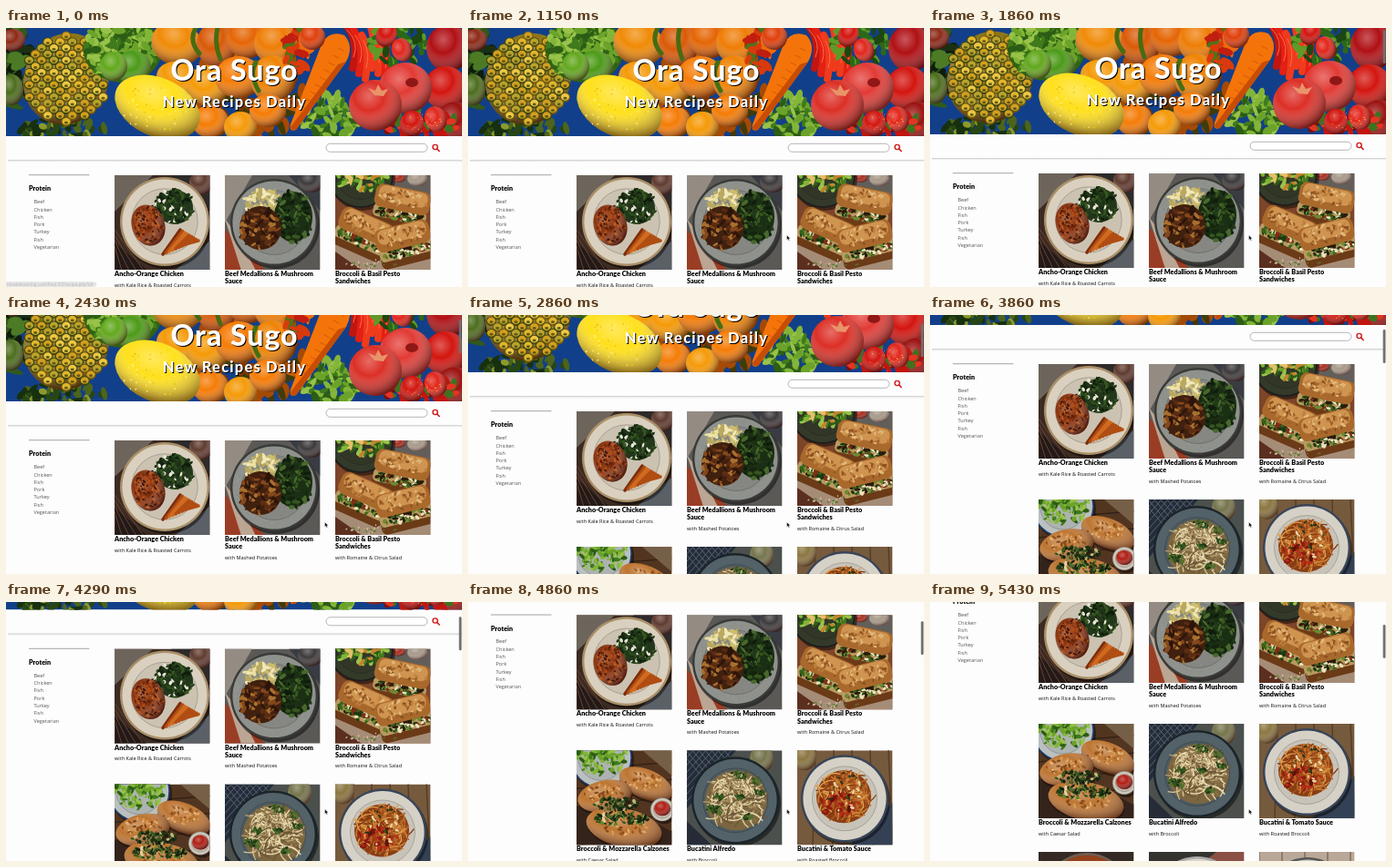
Write an HTML page that moves like this. It is 500 px wide and 285 px high and loops after 5570 ms.

```html
<!DOCTYPE html>
<html lang="en">
<head>
<meta charset="utf-8">
<title>Recipes</title>
<style>
html, body { margin: 0; width: 100%; height: 100%; overflow: hidden; background: #fdfdfd; }
#stage { display: block; width: 500px; height: 285px; }
.brand { font: 800 32px Lato, sans-serif; letter-spacing: 1px; }
.tagline { font: 800 16.5px Lato, sans-serif; letter-spacing: 1.2px; }
.brand, .tagline { fill: #fff; text-anchor: middle; filter: drop-shadow(1.3px 1.3px .6px #000); }
.name { font: 900 7.25px Lato, sans-serif; fill: #000; }
.note { font: 5.55px "Open Sans", sans-serif; fill: #111; }
.item { font: 5.55px "Open Sans", sans-serif; fill: #555; }
.status { font: 4.6px "Open Sans", sans-serif; fill: #b4b4b4; }
</style>
</head>
<body>
<svg id="stage" viewBox="0 0 500 285">
  <defs>
    <radialGradient id="round" cx=".38" cy=".32" r=".72">
      <stop offset="0" stop-color="#fff" stop-opacity=".3"/>
      <stop offset=".4" stop-color="#fff" stop-opacity="0"/>
      <stop offset="1" stop-color="#200" stop-opacity=".65"/>
    </radialGradient>
    <linearGradient id="fade" x2="0" y2="1">
      <stop stop-color="#888" stop-opacity=".25"/>
      <stop offset="1" stop-color="#888" stop-opacity="0"/>
    </linearGradient>
  </defs>
  <g id="page"></g>
  <rect id="thumb" x="496.7" width="2.8" height="37" rx="1.4" fill="#707070"/>
  <g id="status">
    <path d="M0 279H95q2 0 2 2V285H0z" fill="#e6e6e6"/>
    <text class="status" x="1" y="283.6">mirabeltanning.com/final-3/3/recipe.php?id=3</text>
  </g>
  <path id="cursor" d="M349.6 228v5.2l1.2-1 .9 1.9 .9-.4-.9-1.9h1.7z" fill="#000" stroke="#fff" stroke-width=".4"/>
</svg>
<script>
let seed = 11;
const random = () => (seed = (seed * 16807) % 2147483647) / 2147483647;
const pick = list => list[Math.floor(random() * list.length)];
const repeat = (n, draw) => Array.from({ length: n }, (_, i) => draw(i)).join('');

const rect = (x, y, w, h, fill, more = '') =>
  `<rect x="${x}" y="${y}" width="${w}" height="${h}" fill="${fill}" ${more}/>`;
const oval = (x, y, rx, ry, fill, turn = 0, more = '') =>
  `<ellipse cx="${x}" cy="${y}" rx="${rx}" ry="${ry}" fill="${fill}" transform="rotate(${turn} ${x} ${y})" ${more}/>`;
const solid = (x, y, rx, ry, fill, turn) =>
  oval(x, y, rx, ry, fill, turn) + oval(x, y, rx, ry, 'url(#round)', turn);
const shape = (d, fill) => `<path d="${d}" fill="${fill}"/>`;
const line = (d, color, width) =>
  `<path d="${d}" fill="none" stroke="${color}" stroke-width="${width}" stroke-linecap="round"/>`;
const text = (kind, x, y, words) =>
  `<text class="${kind}" x="${x}" y="${y}">${words.replace('&', '&amp;')}</text>`;
const frame = (x, y, w, h, body) =>
  `<svg x="${x}" y="${y}" width="${w}" height="${h}">${body}</svg>`;

// Random point inside an ellipse
function spot(x, y, rx, ry) {
  const a = random() * 6.283, r = Math.sqrt(random());
  return [x + Math.cos(a) * r * rx, y + Math.sin(a) * r * ry];
}
const scatter = (n, x, y, rx, ry, size, colors) => repeat(n, () => {
  const [px, py] = spot(x, y, rx, ry);
  return oval(px, py, size * (.6 + random() * .8), size * (.3 + random() * .4), pick(colors), random() * 180);
});
const noodles = (n, x, y, r, colors) => repeat(n, () => {
  const [px, py] = spot(x, y, r * .8, r * .75), w = r * (.15 + random() * .25);
  const a = random() * 6.283, dx = Math.cos(a) * w, dy = Math.sin(a) * w;
  return line(`M${px - dx} ${py - dy}q${dx - dy * .8} ${dy + dx * .8} ${dx * 2} ${dy * 2}`, pick(colors), 1.3);
});
const plate = (x, y, r, rim, base) =>
  oval(x + 2, y + 3, r, r, '#0007') + oval(x, y, r, r, rim) +
  oval(x, y, r * .95, r * .95, base) + oval(x, y, r * .74, r * .74, '#0001', 0, 'stroke="#0003"');

const greens = ['#14240f', '#22391a', '#36551f', '#0f1c0c', '#1b3013'];
const lettuce = ['#3f7a1c', '#6ba32a', '#98c24a', '#2c5c15', '#82b538'];

function banner() {
  const orange = '#f57c06', amber = '#f59a08', red = '#d3150f';
  const pineapple = solid(66, 56, 46, 51, '#8d7416', 25) + repeat(100, i => {
    const u = (i % 10 - 4.5) * 9.5, v = (Math.floor(i / 10) - 4.5) * 9.5;
    const x = 66 + (u - v) * .71, y = 56 + (u + v) * .71;
    if (((x - 66) / 45) ** 2 + ((y - 56) / 48) ** 2 > 1) return '';
    return oval(x, y, 5.6, 5.3, pick(['#4b4a12', '#6f5a14', '#394514'])) +
      oval(x, y - .4, 4.5, 3.8, pick(['#e2b62c', '#d3a01f', '#b9a42c', '#edc843'])) + oval(x, y + 1, 2, 1.4, '#5d5a16');
  });
  const chilies = repeat(6, i =>
    line(`M${372 + i * 9} ${-4 + i % 3 * 6}q${16 - i * 3} 18 ${8 - i * 2} 48`, pick(['#e32013', '#c3150f', '#f03a1c']), 8) +
    line(`M${374 + i * 9} ${2 + i % 3 * 6}q${14 - i * 3} 14 ${7 - i * 2} 30`, '#ff6a4a', 1));
  const carrot = shape('M371 8q-17-6-25 10L312 106q-2 9 6 6L373 37q9-17-2-29z', '#f4740a') +
    shape('M373 37L318 112q-5 2-6-3L364 40z', '#c74c04') +
    repeat(9, i => line(`M${364 - i * 5} ${22 + i * 8}l6 3`, '#c95205', .8));
  return rect(0, 0, 500, 119, '#123f8a') +
    scatter(50, 6, 40, 20, 50, 10, [...greens, '#4c7a25', '#31591d']) +
    solid(7, 13, 14, 12, '#8d2a18') + solid(6, 68, 13, 17, '#4c6d1d') +
    scatter(70, 62, 115, 48, 16, 6, ['#4c641b', '#274613', '#8b9a2c', '#17300f']) +
    pineapple +
    oval(128, 24, 43, 36, '#2f6314') + scatter(160, 126, 22, 40, 31, 6, lettuce) +
    solid(139, 43, 20, 18, '#4c9a18') + solid(118, 42, 15, 16, '#62a81d') +
    scatter(90, 255, 62, 74, 62, 10, ['#7d3604', '#a54a05', '#403b0c', '#c45f06']) +
    solid(187, 17, 28, 24, '#f08a06', 20) + solid(231, 18, 22, 25, '#d95a06') +
    line('M208 0q-8 14 4 28M232 0q-4 17 3 34', '#476b12', 5) +
    solid(190, 58, 26, 20, amber, 25) +
    solid(265, 12, 23, 21, '#e56504') + solid(297, 17, 25, 24, '#ee7d06') +
    solid(222, 63, 23, 22, amber) + solid(255, 54, 26, 23, orange) +
    solid(292, 56, 24, 26, '#ef8304') + line('M274 38q-8 12 3 31', '#456f14', 5) +
    solid(224, 103, 20, 18, orange) + solid(257, 109, 18, 17, amber) +
    solid(287, 91, 20, 18, orange) +
    solid(166, 87, 49, 32, '#ffe01c', 24) + scatter(60, 166, 87, 42, 26, 1.2, ['#fff08a', '#e8c40c']) +
    scatter(30, 320, 22, 15, 26, 7, ['#d93a0c', '#c11e0f', '#ee6a0c', '#4c741a']) +
    scatter(80, 356, 97, 34, 24, 6, lettuce) + chilies + carrot +
    solid(336, 10, 14, 14, '#e0400c') +
    scatter(60, 432, 16, 32, 24, 6, ['#2c6818', '#5f9a28', '#1d4712']) +
    solid(417, 8, 11, 13, red, 30) + solid(434, 24, 11, 13, '#e2261c', -25) +
    solid(485, 22, 24, 26, '#b01015') + solid(482, 66, 24, 24, red) +
    solid(493, 103, 22, 22, '#9a1210') + scatter(50, 455, 106, 40, 14, 7, ['#c3150f', '#e53322', '#7c0e0b', '#3d7320']) +
    solid(438, 66, 29, 28, '#e23a34') + oval(445, 60, 7, 5, '#8f1715') +
    solid(405, 85, 29, 28, '#dc2f26') + shape('M404 74l-7-8 8 3 3-7 4 7 7-2-5 8z', '#e8946a') +
    solid(445, 105, 13, 14, red, 20) + solid(471, 100, 12, 14, '#e2261c', -20) +
    scatter(40, 458, 103, 20, 11, .7, ['#f6b04b']) +
    text('brand', 250.5, 58.3, 'Ora Sugo') + text('tagline', 250.5, 87, 'New Recipes Daily');
}

const sandwich = (x, y, turn) => `<g transform="translate(${x} ${y}) rotate(${turn}) scale(1.18)">` +
  rect(-25, 0, 50, 19, '#6b3a17', 'rx="5"') + rect(-25, 0, 50, 12, '#b99a62', 'rx="4"') +
  scatter(70, 0, 6, 24, 5, 2.6, ['#37611c', '#1d3a10', '#efe0bd', '#7d2f16', '#6c8a30', '#2a1a0c']) +
  rect(-26, -19, 52, 22, '#a9692c', 'rx="7"') + rect(-23, -18, 46, 14, '#cf9450', 'rx="6"') +
  scatter(50, 0, -9, 23, 8, 2, ['#e2b87a', '#a2622a', '#bd8040', '#8d5220']) + '</g>';
const calzone = (x, y, rx, ry, turn) =>
  oval(x + 1, y + 3, rx, ry, '#20100a99', turn) + solid(x, y, rx, ry, '#bd7531', turn) +
  scatter(40, x, y - 3, rx * .75, ry * .6, 2, ['#d99c58', '#98561f', '#e4b67b', '#84481a']);

const photos = [
  () => rect(0, 0, 105, 105, '#3c2b22') + shape('M0 0H42L0 40z', '#6d655c') + shape('M62 0H105V40z', '#2e2a2a') +
    shape('M0 74L36 105H0z', '#211a18') + shape('M105 72V105H66z', '#5a6066') +
    repeat(5, i => line(`M${i * 8} 105L0 ${84 - i * 6}`, '#6d4032', 1)) +
    solid(95, 8, 13, 13, '#5f3b2f') +
    plate(55, 51, 49, '#a98f68', '#d9d0bf') +
    oval(66, 35, 20, 19, '#22371b') +
    scatter(120, 65, 34, 22, 19, 2.8, [...greens, '#e9e6d6', '#2c4c1c']) +
    repeat(9, i => line(`M${53 + i * 3.5} ${87 - i * 1.5}L${72 + i * 2.5} ${60 + i * 1.5}`, pick(['#b04d12', '#7d2c0a', '#cf6a20']), 3.5)) +
    solid(37, 55, 18, 23, '#8a330f', -18) +
    scatter(110, 37, 55, 16, 20, 2, ['#5c1f08', '#b04d18', '#742a0b', '#c0632a', '#431706']),
  () => rect(0, 0, 105, 105, '#5b5956') + shape('M0 0H30L0 52z', '#948c83') + shape('M70 0H105V40z', '#393d43') +
    shape('M0 60L45 105H0z', '#9a3d25') + shape('M0 48L14 66 34 105H18z', '#bba593') +
    solid(94, 7, 14, 12, '#3d3a3b') +
    plate(54, 52, 48, '#393b39', '#8f918c') + scatter(110, 54, 52, 43, 43, .6, ['#6c6e69', '#a9aba5']) +
    scatter(70, 42, 31, 21, 14, 4, ['#eadf9f', '#cdbd70', '#f1e8b9', '#b9a85f']) +
    oval(75, 46, 21, 28, '#1a2f13') + scatter(110, 75, 46, 21, 28, 3.5, [...greens, '#48692c']) +
    oval(39, 58, 23, 24, '#40200e') +
    scatter(100, 39, 58, 22, 22, 3.5, ['#5c2d14', '#2b140a', '#84481c', '#a9702f', '#40200e']),
  () => rect(0, 0, 105, 105, '#7d4529') + shape('M60 0H105V30L62 16z', '#625e5a') + shape('M0 66H105V105H0z', '#a58c77') +
    shape('M0 84L30 105H0z', '#5b2f20') + solid(69, 3, 8, 5, '#a92f20') + solid(90, 4, 11, 8, '#a89a8a') +
    plate(28, 0, 36, '#1d1e1d', '#343a2a') + scatter(110, 28, 0, 29, 16, 4, [...lettuce, '#c3832e', '#e3c06a']) +
    sandwich(72, 36, 12) + sandwich(30, 65, 24) + sandwich(76, 76, -14) +
    scatter(25, 40, 98, 28, 5, 1.6, ['#5b7b35', '#d0b69b']),
  () => rect(0, 0, 105, 105, '#523521') + repeat(6, i => line(`M0 ${i * 21}L105 ${i * 19 - 6}`, '#352216', 1.5)) +
    shape('M72 0H105V28z', '#756047') +
    plate(27, 8, 34, '#1d3c6b', '#b9c0bf') + scatter(130, 27, 6, 28, 21, 3.6, lettuce) +
    shape('M0 62L30 46 105 90V105H0z', '#33231a') +
    calzone(76, 37, 31, 16, 23) + calzone(31, 50, 30, 17, -12) + calzone(52, 85, 42, 21, 12) +
    scatter(90, 44, 59, 25, 7, 2.6, [...greens, '#c8b47a', '#8d7a45']) +
    scatter(90, 49, 75, 30, 7, 2.6, [...greens, '#5f8a2a', '#e3d19c', '#56682b']) +
    plate(94, 65, 13, '#8a867f', '#cfc7ba') + solid(94, 64, 9, 8, '#b01f14'),
  () => rect(0, 0, 105, 105, '#4c504d') + shape('M0 0H54L0 64z', '#232c3a') +
    repeat(8, i => line(`M${i * 7} 0L0 ${i * 8}M${i * 7 - 8} 0l24 28`, '#59616c', 1)) +
    solid(82, 9, 13, 15, '#75744c') + shape('M0 78L28 105H0z', '#252c37') +
    plate(53, 55, 48, '#1a2429', '#536168') + oval(54, 55, 34, 33, '#7c6640') +
    noodles(150, 54, 55, 35, ['#d9c798', '#b39a6a', '#eadbb1', '#8d744a', '#6b5636']) +
    repeat(10, () => scatter(14, ...spot(56, 55, 31, 31), 5, 4, 2.2, ['#35571f', '#1f3816', '#56702f'])),
  () => rect(0, 0, 105, 105, '#765a3d') + repeat(6, i => line(`M${i * 20} 0L${i * 22 - 5} 105`, '#543d29', 1.5)) +
    solid(8, 7, 13, 15, '#8a7640') + shape('M105 57V105H57z', '#344154') +
    plate(52, 53, 48, '#384459', '#d6d1c6') + oval(51, 51, 30, 29, '#8a3f14') +
    noodles(150, 51, 49, 31, ['#cf8034', '#a9541f', '#e0a050', '#84390f', '#b96a28']) +
    scatter(45, 46, 61, 22, 13, 3.2, ['#8f1c0f', '#b52f18', '#5f1409']) +
    scatter(26, 53, 46, 21, 22, 2, ['#425a1d', '#22351a', '#ead7a6']),
  () => rect(0, 0, 105, 105, '#342924') + plate(53, 49, 48, '#6b6057', '#93421d'),
  () => rect(0, 0, 105, 105, '#8a5045') + shape('M0 0H74L0 60z', '#34332f') + plate(53, 54, 49, '#aaa', '#ddd6ca'),
  () => rect(0, 0, 105, 105, '#b9a797') + repeat(5, i => line(`M${i * 25} 0V105`, '#8e7c6d', 2)) + plate(53, 54, 48, '#555', '#ccc')
];

const recipes = [
  ['Ancho-Orange Chicken', '', 'with Kale Rice & Roasted Carrots'],
  ['Beef Medallions & Mushroom', 'Sauce', 'with Mashed Potatoes'],
  ['Broccoli & Basil Pesto', 'Sandwiches', 'with Romaine & Citrus Salad'],
  ['Broccoli & Mozzarella Calzones', '', 'with Caesar Salad'],
  ['Bucatini Alfredo', '', 'with Broccoli'],
  ['Bucatini & Tomato Sauce', '', 'with Roasted Broccoli']
];
const rowTops = [162, 311, 452];

function card(photo, i) {
  const x = 119 + i % 3 * 121, y = rowTops[Math.floor(i / 3)];
  const [first, second, note] = recipes[i] || ['', '', ''];
  return frame(x, y, 104.3, 104, photo()) +
    text('name', x, y + 111.2, first) + text('name', x, y + 119.3, second) +
    text('note', x, y + (second ? 130.7 : 122.7), note);
}

const proteins = ['Beef', 'Chicken', 'Fish', 'Pork', 'Turkey', 'Fish', 'Vegetarian'];
const byId = id => document.getElementById(id);
const page = byId('page');
page.innerHTML = frame(0, 0, 500, 119, banner()) +
  rect(351, 127.3, 111, 9, '#fff', 'rx="4.5" stroke="#a3a3a3" stroke-width=".8"') +
  '<circle cx="470.6" cy="131" r="2.6" fill="none" stroke="#d21a1a" stroke-width="1.4"/>' +
  line('M472.6 133l2.5 2.5', '#d21a1a', 1.7) +
  rect(2, 145.4, 498, 2.5, 'url(#fade)') + rect(2, 145, 498, .8, '#d0d0d0') +
  rect(25, 161.3, 66.5, .9, '#999') +
  text('name', 25, 179.4, 'Protein') +
  proteins.map((p, i) => text('item', 30.5, 193.2 + i * 8.32, p)).join('') +
  photos.map(card).join('');

// [tick, scroll offset], seven ticks per second
const scrollKeys = [[12, 0], [14, 4], [17, 24], [20, 56], [24, 92], [27, 108], [29, 109],
  [30, 110.5], [32, 128], [34, 147.7], [38, 177]];
const LOOP = 5570, TICK = 1000 / 7;

function scrollAt(tick) {
  const next = scrollKeys.findIndex(([k]) => k >= tick);
  if (next < 1) return 0;
  const [k0, s0] = scrollKeys[next - 1], [k1, s1] = scrollKeys[next];
  return s0 + (s1 - s0) * (tick - k0) / (k1 - k0);
}

function render() {
  const tick = Math.min(38, Math.floor((performance.now() % LOOP + 5) / TICK));
  const scroll = scrollAt(tick);
  page.setAttribute('transform', `translate(0 ${-scroll})`);
  byId('thumb').setAttribute('y', 2 + scroll * .13);
  byId('thumb').style.display = scroll > 0 ? '' : 'none';
  byId('status').style.display = tick < 3 ? '' : 'none';
  byId('cursor').style.display = tick < 3 ? 'none' : '';
  requestAnimationFrame(render);
}
render();
</script>
</body>
</html>
```
